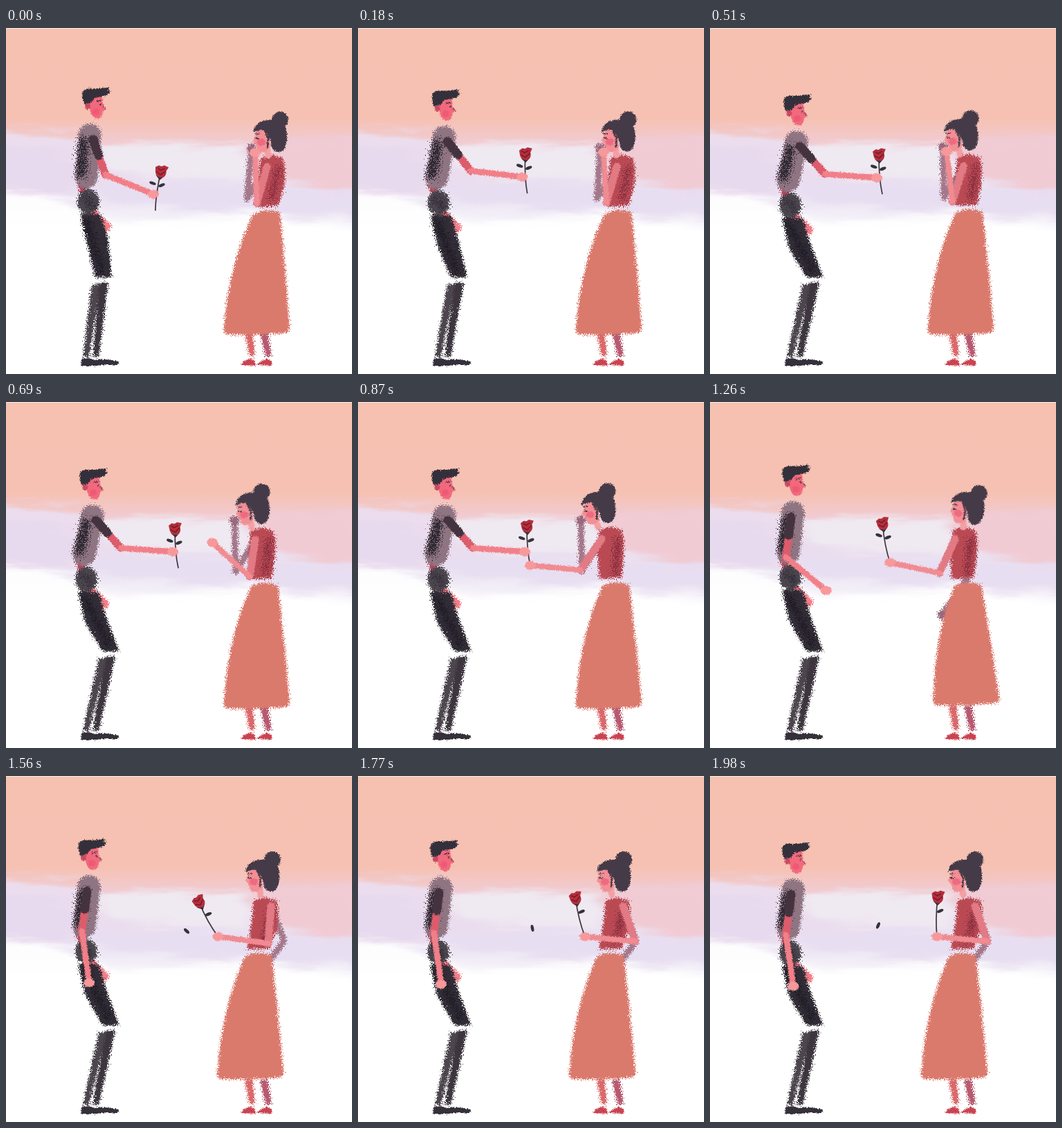
Write an HTML page that moves like this. It is 500 by 500 pixels and loops after 2.01 s.

```html
<!DOCTYPE html>
<html lang="en">
<head>
<meta charset="utf-8">
<title>A rose</title>
<style>
html, body { margin: 0; width: 100%; height: 100%; overflow: hidden; background: #fff }
svg { display: block; width: 100vw; height: 100vh }
</style>
</head>
<body>
<svg viewBox="0 0 500 500">
  <defs>
    <linearGradient id="sky" x2="0" y2="1">
      <stop offset="0" stop-color="#f6c1b1"/>
      <stop offset=".26" stop-color="#f6c1b2"/>
      <stop offset=".33" stop-color="#f1cbd0"/>
      <stop offset=".39" stop-color="#ece0f0"/>
      <stop offset=".5" stop-color="#ece5f3"/>
      <stop offset=".58" stop-color="#fbf9fc"/>
      <stop offset=".63" stop-color="#fff"/>
    </linearGradient>
    <filter id="wash" x="-20%" y="-20%" width="140%" height="140%" color-interpolation-filters="sRGB">
      <feTurbulence type="fractalNoise" baseFrequency=".01 .06" numOctaves="4" seed="4" result="n"/>
      <feGaussianBlur in="SourceGraphic" stdDeviation="9 5"/>
      <feDisplacementMap in2="n" scale="34" xChannelSelector="R" yChannelSelector="G"/>
    </filter>
  </defs>
  <rect width="500" height="500" fill="url(#sky)"/>
  <g filter="url(#wash)">
    <path d="M-20 151Q60 146 120 162T250 166L250 240H-20Z" fill="#ebddee"/>
    <path d="M-20 178Q50 174 105 192L125 226Q60 240-20 228Z" fill="#e7d9ee"/>
    <path d="M360 166Q430 150 520 160V235Q420 228 360 205Z" fill="#f0cbd4"/>
    <path d="M130 172Q240 158 350 176L345 214Q240 222 150 210Z" fill="#efe9f1"/>
    <path d="M90 226Q250 218 520 232V276Q300 268 160 252Z" fill="#e8def1"/>
    <path d="M-20 236Q60 234 110 260T270 276T520 298V520H-20Z" fill="#fff" opacity=".9"/>
  </g>
  <path d="M0 .5H500" stroke="#f5e9e6"/>
  <g id="scene"></g>
</svg>
<script>
const LOOP = 2010, STEP = 30;
const ink = '#322d36', hair = '#453a47', skin = '#f27f88', glow = '#f7989b', dusk = '#a4788a';

const add = ([x, y], dx, dy) => [x + dx, y + dy];
const mix = (a, b, k) => a.map((v, i) => v + (b[i] - v) * k);
const polar = (p, deg, r) => add(p, r * Math.cos(deg * Math.PI / 180), r * Math.sin(deg * Math.PI / 180));

// Elbow of a two-bone arm of fixed lengths
function elbowOf(a, b, upper = 54, lower = 73) {
  const d = Math.hypot(b[0] - a[0], b[1] - a[1]), ux = (b[0] - a[0]) / d, uy = (b[1] - a[1]) / d;
  const along = (upper ** 2 - lower ** 2 + d * d) / (2 * d);
  const out = Math.sqrt(Math.max(0, upper ** 2 - along ** 2));
  return add(a, along * ux + out * uy, along * uy - out * ux);
}

// All joints follow from a few eased phases of the story
function pose(t) {
  const ease = (from, to) => {
    const u = Math.min(1, Math.max(0, (t - from) / (to - from)));
    return u * u * (3 - 2 * u);
  };
  const raise = ease(0, 240), sink = ease(0, 500) - ease(870, 1200) / 2 + ease(1600, 1980) / 2;
  const drop = ease(940, 1260), hang = ease(1200, 1560);
  const lean = ease(0, 510) * .55 + ease(540, 870) * .45;
  const take = ease(540, 870), grip = ease(780, 900), back = ease(900, 1260);
  const turn = ease(1300, 1560), pull = ease(1200, 1770), sniff = ease(1560, 1980);

  const man = {
    head: [-4 * raise - 2 * drop, 10 * sink],
    top: [121 + 4 * raise - 5 * drop, 155 + 10 * sink],
    hip: [119 - 3 * raise, 251 + 5 * sink],
    knee: [140 + 10 * ease(0, 360), 364]
  };
  man.shoulder = add(man.top, 5 - 8 * drop, 6);
  man.elbow = polar(man.shoulder, 71 - 23 * raise + 49 * drop, 54 + 5 * drop);
  man.hand = polar(man.elbow, 22 - 18 * raise + 32 * drop + 46 * hang, 75);

  const woman = {
    head: [22 * back - 33 * lean - 2 * sniff, -3 * lean - 9 * turn],
    tilt: 10 * back - 4 * lean - 6 * turn,
    top: [385 - 19 * lean + 2 * back + 7 * turn, 186 - 3 * lean - 5 * turn],
    waist: [376 - 4 * lean - 8 * turn, 260 - 3 * lean - 5 * turn],
    hem: [362 + 8 * back - 17 * turn, 439 - 5 * back]
  };
  woman.base = add(woman.waist, 8 * (turn - lean), 0);
  woman.shoulder = add(woman.top, 22 * turn - 6 * take - 8, 15 - 5 * turn);
  woman.hand = mix(add(woman.head, 360, 180), [249 + 9 * back + 70 * pull, 236 - 4 * back], take);
  woman.elbow = elbowOf(woman.shoulder, woman.hand);
  woman.farHand = mix(add(woman.head, 355, 174), [336 + 22 * turn, 307 - 10 * turn], back);
  woman.farElbow = elbowOf(woman.shoulder, woman.farHand);

  const lay = 98 - 13 * raise - 6 * back - 18 * turn + 30 * sniff;
  const end = mix(add(polar(man.hand, lay, 24), 6, 0), woman.hand, grip);
  const bloom = polar(end, lay, -57), stalk = mix(bloom, end, .35);
  const fallen = mix([261, 224], [243, 216], sniff);
  const leaf = mix(add(stalk, -9, -3), fallen, turn);
  return { man, woman, rose: { bloom, end, stalk, leaf, lay, spin: 20 + 22 * turn + 73 * sniff } };
}

const line = (w, c, ...pts) => `<polyline points="${pts}" fill="none" stroke="${c}" stroke-width="${w}" stroke-linecap="round" stroke-linejoin="round"/>`;
const shape = (c, ...pts) => `<polygon points="${pts}" fill="${c}" stroke="${c}" stroke-width="5" stroke-linejoin="round"/>`;
const path = (c, d) => `<path d="${d}" fill="${c}"/>`;
const oval = (c, [x, y], rx, ry, turn = 0) => `<ellipse rx="${rx}" ry="${ry}" fill="${c}" transform="translate(${x} ${y}) rotate(${turn})"/>`;
const moved = (transform, art) => `<g transform="${transform}">${art}</g>`;
const palm = p => oval(glow, p, 8, 6.5);

function manBody({ top, hip, knee }) {
  const pocket = add(hip, 27, 36);
  return line(11, '#b24a5a', add(top, -13, 28), add(hip, -14, -38), add(hip, 2, 12)) +
    line(10, '#dd6675', add(hip, 6, 14), pocket) + oval(skin, pocket, 6, 7) +
    shape('#4d464e', add(knee, -14, 9), add(knee, -7, 9), [118, 473], [114, 473]) +
    shape('#3d363f', add(knee, -3, 6), add(knee, 5, 6), [132, 473], [128, 473]) +
    shape(ink, add(hip, -9, 20), add(hip, 16, 21), add(hip, 26, 55), add(knee, 10, -6), add(knee, -9, -6), add(hip, 1, 62)) +
    oval('#4b464e', hip, 16, 18) +
    line(33, '#8f7482', top, add(hip, -3, -36));
}

function womanBody({ top, base, waist, hem, shoulder, farElbow, farHand }) {
  const at = (p, x, y) => add(p, x, y).join(' '), mid = mix(waist, hem, .5);
  return line(9, dusk, shoulder, farElbow, farHand) + oval('#99687c', farHand, 7, 7) +
    shape('#d9696b', [348, 441], [354, 441], [357, 472], [354, 473]) +
    shape('#b65a70', [370, 441], [376, 441], [381, 472], [377, 473]) +
    shape('#b94a54', add(top, -15, 4), add(top, 0, 0), add(top, 13, 4), add(top, 16, 18), add(top, 15, 42), add(base, 15, -5), add(base, -13, -4), add(top, -18, 34)) +
    path('#da7a6d', `M${at(waist, -19, 9)}Q${at(waist, 0, -1)} ${at(waist, 20, 7)}Q${at(mid, 35, 0)} ${at(hem, 48, -6)}Q${at(hem, 49, 1)} ${at(hem, 38, 2)}Q${at(hem, 0, 5)} ${at(hem, -42, 4)}Q${at(hem, -50, 2)} ${at(hem, -47, -10)}Q${at(mid, -46, -10)} ${at(waist, -19, 9)}`);
}

const shade = (m, w) =>
  line(13, '#2e2933', add(m.top, -9, 10), add(m.hip, -10, -40)) +
  line(8, '#332e38', add(m.hip, -4, -6), add(m.hip, 6, 8)) +
  line(9, '#211d26', add(m.hip, -2, 28), add(m.knee, -2, -14)) +
  line(8, '#8a3040', add(w.top, 9, 16), add(w.base, 8, -12));

const shoes =
  path('#35303a', 'M109 479Q120 475 131 480L133 488H108ZM131 479Q145 478 163 482L162 487H128Z') +
  path('#c94351', 'M339 487Q342 481 352 478L360 481V488ZM362 487Q367 482 376 478L384 481V488Z');

function manHead([x, y]) {
  return moved(`translate(${x} ${y})`,
    path('#f2697d', 'M120 97L139 95 140 111 145 117 140 120Q140 130 132 131Q124 130 121 119Z') +
    oval('#ee5a74', [130, 121], 5, 5) + oval('#c84b60', [118, 113], 4, 5) +
    path('#34303b', 'M113 110Q109 99 111 92Q116 86 126 88L150 86 147 90 151 91Q148 98 138 99L128 101 123 108Z') +
    line(1.7, ink, [131, 106], [137, 105]) + oval(ink, [137, 111], 1.2, 1.4) +
    line(1.5, '#a3435e', [140, 112], [144, 117]));
}

function womanHead([x, y], tilt) {
  return moved(`translate(${x} ${y}) rotate(${tilt} 380 170)`,
    line(9, '#f3a0a4', [377, 174], [379, 184]) +
    path('#f28f95', 'M362 146L380 148 382 172Q375 183 365 178L361 168 357 163 360 157Z') +
    oval('#ee6a80', [369, 165], 6, 5) +
    path(hair, 'M357 151Q360 134 380 133Q399 131 405 146Q409 166 400 177Q390 183 384 172Q383 158 373 148Q366 146 357 151Z') +
    oval(hair, [396, 133], 12, 12) +
    line(2.5, hair, [374, 149], [379, 160], [378, 172]) +
    line(1.5, ink, [360, 153], [366, 153]) + line(1.8, ink, [361, 159], [365, 160]));
}

const manArm = ({ shoulder, elbow, hand }) =>
  line(11, '#dc5c6c', mix(shoulder, elbow, .4), elbow) + line(8.5, skin, elbow, hand) +
  line(13, '#44333f', shoulder, mix(shoulder, elbow, .45));

const womanArm = ({ shoulder, elbow, hand }) =>
  line(11, '#e27a84', shoulder, elbow) + line(8, '#f08b91', elbow, hand);

function flower({ bloom, end, stalk, leaf, lay, spin }) {
  return `<path d="M${bloom}Q${add(mix(bloom, end, .55), -3, 2)} ${end}" fill="none" stroke="#3c3840" stroke-width="1.7"/>` +
    oval('#34333a', add(stalk, 4, 0), 5, 2.2, -22) + oval('#34333a', leaf, 5, 2.2, spin) +
    moved(`translate(${bloom}) rotate(${lay - 90}) scale(.95)`,
      path('#343038', 'M-7 6L0 13 7 6 1 9Z') +
      path('#b42e3b', 'M-9-6L-4-9 0-8 4-10 11-8 8-2Q10 6 3 9Q-6 10-8 2Z') +
      line(1.4, '#6e1929', [-5, -5], [-1, -2], [5, -5]) +
      line(1.4, '#6e1929', [-6, 1], [0, 5], [7, -1]));
}

const grain = (id, scale) => `<filter id="${id}" color-interpolation-filters="sRGB"><feTurbulence type="fractalNoise" baseFrequency=".67" numOctaves="3" seed="7" result="n"/><feDisplacementMap in="SourceGraphic" in2="n" scale="${scale}" xChannelSelector="R" yChannelSelector="G"/><feGaussianBlur stdDeviation=".5"/></filter>`;
document.querySelector('defs').insertAdjacentHTML('beforeend', grain('rough', 13) + grain('spray', 34) + grain('soft', 5));

const scene = document.getElementById('scene');
const layer = (filter, art) => `<g filter="url(#${filter})">${art}</g>`;
const start = performance.now();
let shown = -1;

function draw() {
  const t = Math.floor((performance.now() - start) % LOOP / STEP) * STEP;
  if (t !== shown) {
    shown = t;
    const { man, woman, rose } = pose(t);
    scene.innerHTML =
      layer('rough', manBody(man) + womanBody(woman)) +
      layer('spray', shade(man, woman)) +
      layer('soft', shoes + manHead(man.head) + womanHead(woman.head, woman.tilt) + manArm(man) + womanArm(woman)) +
      flower(rose) +
      layer('soft', palm(man.hand) + palm(woman.hand));
  }
  requestAnimationFrame(draw);
}
draw();
</script>
</body>
</html>
```
